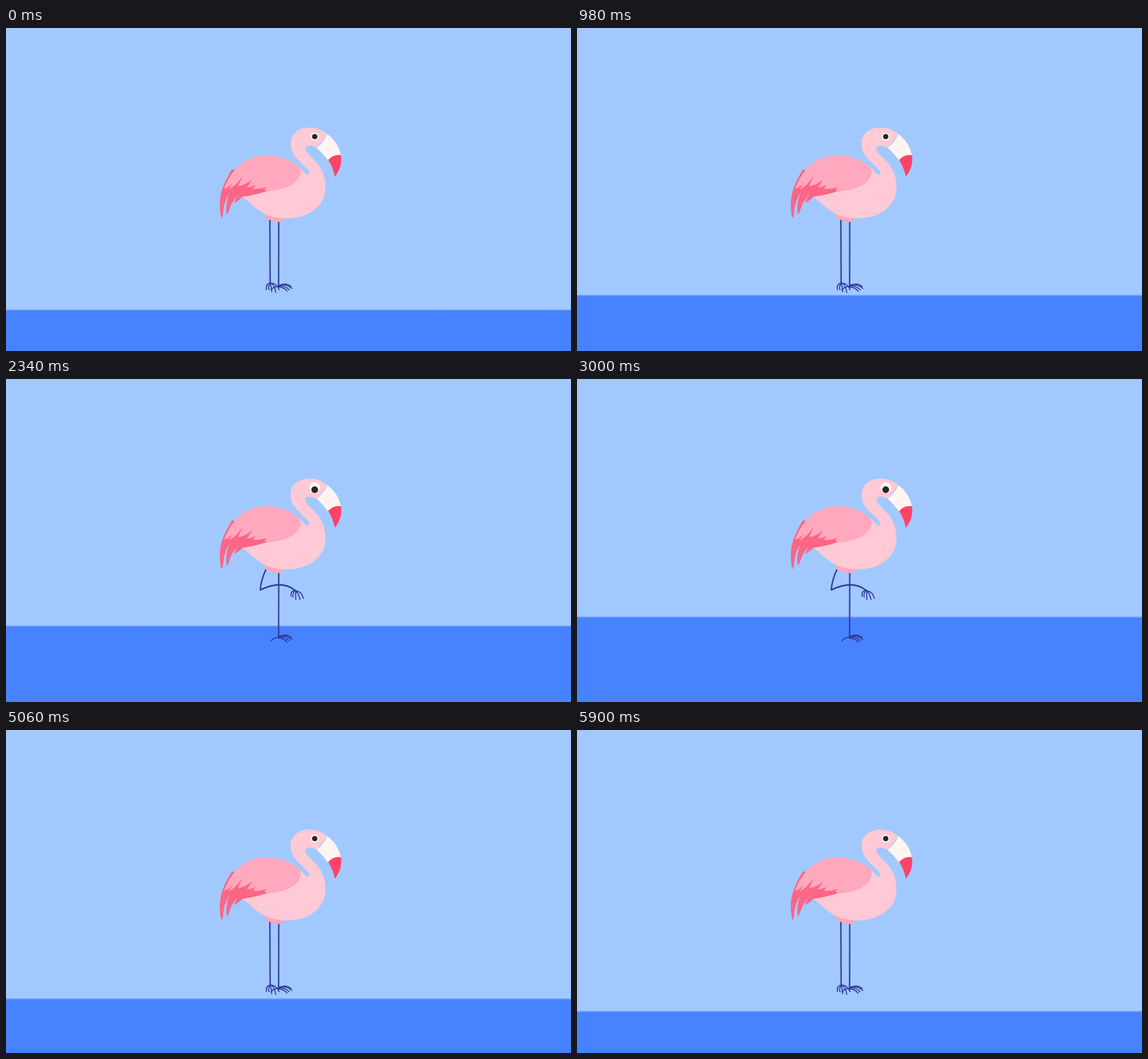
An HTML page with a canvas for the animation above (5940 ms loop, 840 px wide and 480 px high).

```html
<!DOCTYPE html>
<html lang="en">
<head>
<meta charset="utf-8">
<title>Flamingo and the rising tide</title>
<style>
  html, body { margin: 0; width: 100%; height: 100%; overflow: hidden; background: #a1c9ff; }
  canvas { display: block; }
</style>
</head>
<body>
<canvas id="stage" width="840" height="480"></canvas>
<script>
const ctx = document.getElementById('stage').getContext('2d');
const LOOP = 5940;
const HALF = LOOP / 2;
const LOW = 419, HIGH = 353;
const LIFT = 1200, TUCK = 2220;   // times at which the leg goes up, mirrored on the way back

const SKY = '#a1c9ff', WATER = '#4783ff', LEG = '#2f3699';
const path = d => new Path2D(d);

const body = path(`M478 158 C470 151 460 148 451 148 C434 148 423 158 423 172
  C423 190 438 198 450 212 Q452 217 449 218 Q445 218 437 207
  C410 196 350 215 345 245 C352 252 358 255 364 261 C378 275 394 283 417 283
  C452 283 475 263 475 237 C475 214 465 203 456 194
  C449 187 445 183 445 179 C446 173 455 174 462 178 Z`);
const thigh = path('M385 275 C384 283 388 286 393 285 Q398 289 404 288 L410 289 Q412 285 411 280 Z');
const plumes = path(`M336 210 C323 230 317 248 318 264 Q318 278 321 283
  Q323 279 323 271 Q325 256 332 245 Q326 261 328 277 Q331 275 333 267
  Q337 256 345 248 Q340 256 339 260 Q346 257 351 251 Q372 248 389 242 L380 220 Z`);
const wing = path(`M437 207 C424 196 406 189 386 189 C357 190 337 206 324 239
  Q331 237 337 230 L331 240 Q343 234 352 219 L345 235 Q355 234 366 225
  L358 237 Q364 237 371 233 L367 239 Q376 240 388 236 L384 240 L389 243
  C413 241 438 232 438 213 Z`);
const beak = path('M478 158 C488 165 496 177 498 190 L479 197 Q472 187 462 178 Q471 171 478 158 Z');
const beakTip = path('M498 189 C500 201 496 212 489 221 Q486 207 479 196 Q487 187 498 189 Z');
const rays = path(`M450 125 L457 125 L455.5 139 L452 139 Z
  M431.5 135 L436 131 L445 141 L442 144 Z M472 131 L476.5 135 L466 144 L463 141 Z`);

const standing = path('M405.5 288 L405.3 384');
const standingToes = path(`M405 384 Q398 384 394 389 M405 385 Q413 385 418 391
  M405 384 Q414 382 421 389 M406 383 Q416 379 425 387 M407 382 Q417 378 424 384`);

// The moving leg: straight, lifted, tucked
const legs = [
  [path('M392.3 285 L392.7 380'),
   path('M393 379 Q386 380 387 389 M393 380 Q389 384 391 389 M393 380 Q395 386 395 392 M394 379 Q400 383 401 393 M394 379 Q403 380 406 389')],
  [path('M389 285 Q374 326 370 352 Q377 350 383 348'),
   path('M382 348 Q377 351 379 357 M383 348 Q389 353 386 361 M384 348 Q391 352 391 361 M384 348 Q393 347 397 360 M370 353 L374 353')],
  [path('M387.5 281 Q379 298 378 313.5 Q409 298 430 314'),
   path('M430 314 Q422 315 424 323 M430 314 Q425 320 427 324 M431 314 Q430 321 431 328 M431 315 Q436 320 437 328 M431 315 Q440 316 442 326')]
];

// White radius and height, pupil radius and height
const eyes = [[6, 161.3, 3.9, 161.3], [8, 161.5, 3.7, 164], [8, 161.5, 5, 164.5]];

function fill(shape, color) {
  ctx.fillStyle = color;
  ctx.fill(shape);
}

function stroke(shape, width) {
  ctx.strokeStyle = LEG;
  ctx.lineWidth = width;
  ctx.stroke(shape);
}

function dot(x, y, r, color) {
  ctx.fillStyle = color;
  ctx.beginPath();
  ctx.arc(x, y, r, 0, Math.PI * 2);
  ctx.fill();
}

function drawWater(level) {
  const edge = ctx.createLinearGradient(0, level - 1.5, 0, level + 1.5);
  edge.addColorStop(0, SKY);
  edge.addColorStop(1, WATER);
  ctx.fillStyle = edge;
  ctx.fillRect(0, level - 1.5, 840, 482 - level);
}

function drawBird(pose, startled) {
  ctx.lineCap = ctx.lineJoin = 'round';
  const [leg, toes] = legs[pose];
  stroke(leg, 2);
  stroke(toes, 1.5);
  stroke(standing, 2);
  stroke(standingToes, 1.5);
  fill(thigh, '#ffa6bd');
  fill(body, '#ffc9d5');
  fill(plumes, '#ff6585');
  fill(wing, '#ffa8be');
  fill(beak, '#fff5f0');
  fill(beakTip, '#ff4268');
  const [r, y, pr, py] = eyes[pose];
  dot(459, y, r, '#fff5f0');
  dot(459, py, pr, '#262626');
  if (startled) fill(rays, '#2f65ee');
}

function draw(now) {
  const t = now % LOOP;
  const tide = HALF - Math.abs(t - HALF);
  const pose = tide < LIFT ? 0 : tide < TUCK ? 1 : 2;
  ctx.fillStyle = SKY;
  ctx.fillRect(0, 0, 840, 480);
  drawWater(LOW + (HIGH - LOW) * tide / HALF);
  drawBird(pose, pose === 1 && t < HALF);
  requestAnimationFrame(tick);
}

const start = performance.now();
function tick() {
  draw(performance.now() - start);
}
tick();
</script>
</body>
</html>
```
